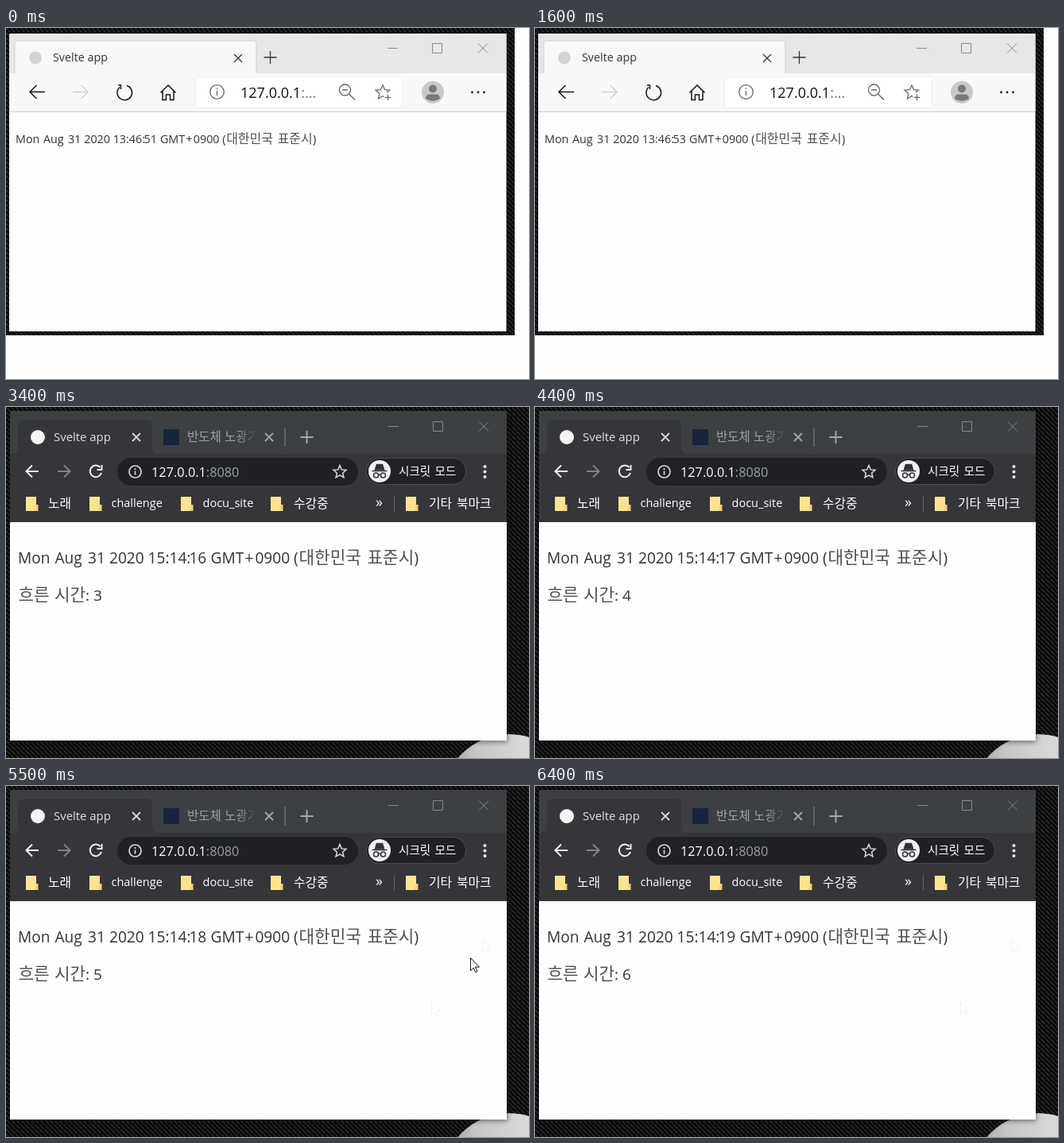
These frames come from a looping animation (658x442 px, 7.1 s). An HTML page:

```html
<!DOCTYPE html>
<html lang="ko">
<head>
<meta charset="utf-8">
<title>Clock</title>
<style>
  html, body { margin: 0; width: 100%; height: 100%; overflow: hidden; background: #fefefe; }
  svg { display: block; width: 658px; height: 442px; }
  text { font-family: "Open Sans", "Noto Sans CJK KR", "Noto Sans CJK JP", sans-serif; white-space: pre; }
  .ko { font-family: "Noto Sans CJK KR", "Noto Sans CJK JP", "Noto Sans CJK", sans-serif; }
  .page { fill: #333; }
  .page .ko { font-weight: 300; fill: #505050; }
  .line { fill: none; }
</style>
</head>
<body>
<svg viewBox="0 0 658 442" lang="ko">
  <defs>
    <pattern id="carbon" width="6" height="6" patternUnits="userSpaceOnUse">
      <rect width="6" height="6" fill="#080808"/>
      <path d="M0 0L3 3M3 3L6 6" stroke="#282828" stroke-width="1.8"/>
    </pattern>
    <linearGradient id="ball">
      <stop offset="0" stop-color="#999"/>
      <stop offset=".25" stop-color="#c6c6c6"/>
      <stop offset=".6" stop-color="#d8d8d8"/>
    </linearGradient>
    <linearGradient id="fade" gradientUnits="userSpaceOnUse" x1="290" x2="316" y1="0" y2="0">
      <stop offset="0" stop-color="#9aa0a6"/>
      <stop offset="1" stop-color="#9aa0a6" stop-opacity="0"/>
    </linearGradient>
    <filter id="soft" x="-10%" y="-10%" width="120%" height="120%"><feGaussianBlur stdDeviation="3"/></filter>
    <path id="cross" d="M-5 -5L5 5M5 -5L-5 5"/>
    <path id="plus" d="M-8 0H8M0 -8V8"/>
    <path id="star" d="M0 -8L2.200 -2.600L8 -2.100L3.600 1.700L4.900 7.300L0 4.300L-4.900 7.300L-3.600 1.700L-8 -2.100L-2.200 -2.600Z"/>
    <g id="controls" class="line">
      <path d="M480 25.500H493M536.500 19.500H548.500V31.500H536.500Z"/>
      <path d="M594 19.500L606 31.500M606 19.500L594 31.500"/>
    </g>
    <g id="folder">
      <path d="M0 0H13V15L15 18H0Z" fill="#ffe391"/>
      <path d="M13 10H15.500V18H11Z" fill="#f5d273"/>
    </g>
    <path id="arrow" d="M.5 .5V16.500L4.200 13L6.800 18.500L9 17.500L6.500 12H11.500Z"/>
  </defs>

  <g id="light">
    <rect width="658" height="442" fill="#fefefe"/>
    <rect width="640" height="387" fill="url(#carbon)"/>
    <rect x="4" y="7" width="625.500" height="375" fill="#fefefe"/>
    <rect x="4" y="7" width="625.500" height="50" fill="#e7e7e7"/>
    <path d="M11 57V21Q11 16 16 16H310Q315 16 315 21V57" fill="#f8f8f8" stroke="#cfcfcf"/>
    <rect x="4" y="57" width="625.500" height="48" fill="#f8f8f8"/>
    <path d="M4 105.500H629.500" stroke="#cdcdcd"/>
    <rect x="238.500" y="61.500" width="261" height="39" rx="4" fill="#fff" stroke="#efefef"/>
    <circle cx="37" cy="37.500" r="8" fill="#d4d4d4"/>
    <text x="59" y="42" font-size="14.300" fill="#333">Svelte app</text>
    <g class="line" stroke="#333" stroke-width="1.300">
      <use href="#cross" x="292" y="38"/>
      <use href="#plus" x="332.500" y="37"/>
    </g>
    <use href="#controls" stroke="#8c8c8c"/>
    <g class="line" stroke="#151515" stroke-width="1.500">
      <path d="M49 80.500H30M38.500 72L30 80.500L38.500 89"/>
      <path d="M84 80.500H103M94.500 72L103 80.500L94.500 89" stroke="#d0d0d0"/>
      <path d="M143 74.500A9.300 9.300 0 1 0 152 72.500M141 72H144.500V77"/>
      <path d="M194.500 81.500L204 72L213.500 81.500M197 79.500V90.500H201.500V84H206.500V90.500H211V79.500"/>
    </g>
    <g class="line" stroke="#666" stroke-width="1.300">
      <circle cx="265.500" cy="80.500" r="8.800"/>
      <path d="M265.500 79V85M265.500 75.500V77.200"/>
      <circle cx="426.500" cy="78" r="7"/>
      <path d="M431.500 83L439 90.500M423 78H430"/>
      <path d="M479 81L482.500 78.300L476.600 77.700L474 72L471.400 77.700L465 78.300L469.800 82.600L468.400 89L474 85.700L475.500 86.500M480.500 83.500V91M476.700 87.300H484.300"/>
    </g>
    <text x="295" y="88" font-size="18" fill="#111">127.0.0.1<tspan fill="#777">:…</tspan></text>
    <circle cx="537" cy="81" r="14" fill="#cbc9c7"/>
    <g fill="#7b7876"><circle cx="537" cy="76.500" r="5"/><path d="M528 89Q528 83.500 533 83.500H541Q546 83.500 546 89Q537 95 528 89Z"/></g>
    <g fill="#222"><circle cx="586.500" cy="81" r="1.400"/><circle cx="594" cy="81" r="1.400"/><circle cx="601.500" cy="81" r="1.400"/></g>
    <text id="lightDate" class="page" y="144.800"></text>
  </g>

  <g id="dark" visibility="hidden">
    <rect width="658" height="442" fill="url(#carbon)"/>
    <circle cx="633" cy="496" r="84" fill="url(#ball)"/>
    <rect x="5" y="6" width="626" height="416" opacity=".45" filter="url(#soft)"/>
    <rect x="5" y="5" width="625" height="415" fill="#fefefe"/>
    <rect x="5" y="5" width="625" height="54" fill="#3c4043"/>
    <path d="M7 59Q15 59 15 51V24Q15 16 23 16H176Q184 16 184 24V51Q184 59 192 59Z" fill="#35363a"/>
    <rect x="5" y="59" width="625" height="86" fill="#35363a"/>
    <circle cx="40" cy="38" r="9" fill="#f4f4f4"/>
    <text x="60" y="43" font-size="14.900" fill="#dee1e4">Svelte app</text>
    <rect x="198" y="28" width="20" height="20" fill="#17243c"/>
    <text class="ko" y="43" font-size="15.500" fill="url(#fade)"><tspan x="228">반도체</tspan><tspan x="275">노광기</tspan></text>
    <g class="line" stroke="#d5d7da" stroke-width="1.800">
      <use href="#cross" x="164" y="38"/>
      <use href="#cross" x="331" y="38" stroke="#a2a6aa"/>
      <use href="#plus" x="378.500" y="38" stroke="#a6aaae"/>
      <path d="M351 26V50" stroke="#73777a" stroke-width="1.300"/>
    </g>
    <use href="#controls" x="1" y="-1" stroke="#85898b"/>
    <rect x="140" y="64" width="303" height="35" rx="17.500" fill="#202124"/>
    <rect x="453.500" y="64.500" width="125" height="33" rx="16.500" fill="#202124" stroke="#4a4c50"/>
    <g class="line" stroke="#f1f1f1" stroke-width="2">
      <path d="M41 81H25.500M33 73.500L25.500 81L33 88.500"/>
      <path d="M65 81H80.500M73 73.500L80.500 81L73 88.500" stroke="#808387"/>
      <path d="M118.500 76A7.300 7.300 0 1 0 120 83M120.500 73V79H114.500"/>
      <g stroke="#d8dadd" stroke-width="1.700">
        <circle cx="162.500" cy="81.500" r="7.500"/>
        <path d="M162.500 80.500V85.500M162.500 77V79"/>
        <use href="#star" x="420" y="81.500" stroke-width="1.500"/>
      </g>
    </g>
    <text x="183" y="88" font-size="16.300" fill="#fff">127.0.0.1<tspan fill="#9aa0a6">:8080</tspan></text>
    <circle cx="470" cy="81" r="14" fill="#f1f3f4"/>
    <g class="line" stroke="#303236" stroke-width="1.500">
      <path d="M464.500 79L466.500 72.500H473.500L475.500 79Z" fill="#303236"/>
      <path d="M460.500 80.500H479.500M468.500 85.500Q470 84.500 471.500 85.500"/>
      <circle cx="465.500" cy="86" r="3"/><circle cx="474.500" cy="86" r="3"/>
    </g>
    <text class="ko" y="85.500" font-size="14.600" fill="#fff"><tspan x="494">시크릿</tspan><tspan x="539.500">모드</tspan></text>
    <g fill="#f1f1f1"><circle cx="602.500" cy="75" r="2"/><circle cx="602.500" cy="81.500" r="2"/><circle cx="602.500" cy="88" r="2"/></g>
    <use href="#folder" x="25" y="113"/>
    <use href="#folder" x="105" y="113"/>
    <use href="#folder" x="220" y="113"/>
    <use href="#folder" x="333" y="113"/>
    <use href="#folder" x="503" y="113"/>
    <g fill="#fff" font-size="14.500">
      <text x="132.500" y="126">challenge</text>
      <text x="247.500" y="126">docu_site</text>
      <text x="465" y="126" font-size="18">»</text>
      <g font-size="15.800">
        <text class="ko" x="53" y="126.500">노래</text>
        <text class="ko" x="362" y="126.500">수강중</text>
        <text class="ko" y="126.500"><tspan x="532">기타</tspan><tspan x="567">북마크</tspan></text>
      </g>
    </g>
    <path d="M488.500 112V132" stroke="#62656a"/>
    <g class="page">
      <text id="darkDate" y="197"></text>
      <text y="244" font-size="19"><tspan class="ko" x="15.500" font-size="21.300">흐른</tspan><tspan class="ko" x="61" font-size="21.300">시간</tspan><tspan x="100">:</tspan><tspan id="elapsed" x="110">3</tspan></text>
    </g>
    <g class="line" stroke="#f2f2f2">
      <use id="trailA" href="#arrow" x="535" y="271"/>
      <use id="trailB" href="#arrow" x="599" y="192"/>
    </g>
    <use id="pointer" href="#arrow" fill="#fff" stroke="#111"/>
  </g>
</svg>
<script>
  const LOOP = 7100;
  const DARK_AT = 3400;
  const lightTicks = [0, 700, 1600, 2500];
  const darkTicks = [3400, 4400, 5400, 6400];
  // [time, x, y]; no position means hidden
  const pointerSteps = [
    [0], [5100, 535, 271], [5300, 599, 192], [5400, 603, 194],
    [5500, 584, 216], [6200, 634, 168], [6300]
  ];

  const $ = id => document.getElementById(id);
  const show = (id, on) => $(id).setAttribute('visibility', on ? 'inherit' : 'hidden');
  const passed = (ticks, t) => ticks.filter(tick => tick <= t).length;
  const setText = (id, value) => {
    if ($(id).textContent !== String(value)) $(id).textContent = value;
  };

  // Word starts are given for a 20px line and scaled to the wanted size.
  function buildDate(id, left, size, time) {
    const scale = size / 20;
    const word = (text, offset, attrs = '') =>
      `<tspan x="${left + offset * scale}" ${attrs}>${text}</tspan>`;
    const korean = `class="ko" font-size="${21.3 * scale}"`;
    $(id).setAttribute('font-size', 19.1 * scale);
    $(id).innerHTML =
      word('Mon', 0) + word('Aug', 46.5) + word('31', 88) + word('2020', 115) +
      word(time, 163.6) + word('', 215.4, `id="${id}Sec"`) +
      word('GMT', 242.5) + word('+', 285.5) + word('0900', 298.4) + word('(', 347) +
      word('대한민국', 353.5, korean) + word('표준시', 439.5, korean) + word(')', 498.5);
  }
  buildDate('lightDate', 12, 15, '13:46:');
  buildDate('darkDate', 15, 20, '15:14:');

  function draw(t) {
    const isDark = t >= DARK_AT;
    show('light', !isDark);
    show('dark', isDark);
    setText('lightDateSec', 50 + passed(lightTicks, t));
    const ticks = Math.max(1, passed(darkTicks, t));
    setText('darkDateSec', 15 + ticks);
    setText('elapsed', 2 + ticks);

    const [, x, y] = pointerSteps.findLast(step => step[0] <= t);
    show('pointer', x !== undefined);
    if (x !== undefined) $('pointer').setAttribute('transform', `translate(${x} ${y})`);
    show('trailA', t >= 5300);
    show('trailB', t >= 5400);
  }

  const start = performance.now();
  function frame() {
    draw((performance.now() - start) % LOOP);
    requestAnimationFrame(frame);
  }
  frame();
</script>
</body>
</html>
```
